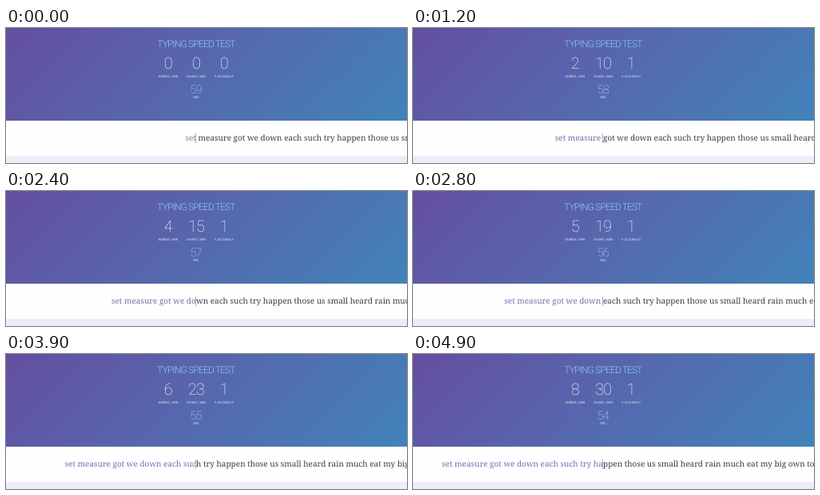
An HTML page for the animation above (5000 ms loop, 502 by 169 pixels).

```html
<!DOCTYPE html>
<html lang="en">
<head>
<meta charset="utf-8">
<title>Typing speed test</title>
<style>
html, body { margin: 0; width: 100%; height: 100%; overflow: hidden; background: #ecedf8; }
#stage { position: relative; width: 502px; height: 169px; overflow: hidden; }
.top { position: absolute; inset: 0 0 auto; height: 116px; background: linear-gradient(135deg, #644f9f, #5766ad 45%, #4183ba); }
.strip { position: absolute; top: 116px; left: 0; width: 100%; height: 44px; background: #fffeff; }
svg { position: absolute; inset: 0; }
text { font-family: Roboto, sans-serif; font-weight: 300; text-anchor: middle; white-space: pre; text-rendering: geometricPrecision; }
.title { font-size: 12px; letter-spacing: -.07em; fill: #88cbf2; }
.big { font-size: 20px; font-weight: 200; letter-spacing: -.05em; fill: #fff; }
.sec { font-size: 14.5px; font-weight: 200; letter-spacing: -.05em; fill: #c4e4f9; }
.label { font-size: 4px; font-weight: 400; fill: #e3e8f6; }
.line { font: 400 10.02px "Noto Serif", serif; }
#typed { text-anchor: end; fill: #6a75ac; }
#rest { text-anchor: start; fill: #3c3c40; }
</style>
</head>
<body>
<div id="stage">
  <div class="top"></div>
  <div class="strip"></div>
  <svg width="502" height="169" viewBox="0 0 502 169">
    <text class="title" x="238" y="23.6">TYPING SPEED TEST</text>
    <text class="big" id="words" x="202.8" y="51.2">0</text>
    <text class="big" id="chars" x="238" y="51.2">0</text>
    <text class="big" id="accuracy" x="272.7" y="51.2">0</text>
    <text class="label" x="203" y="62">WORDS / MIN</text>
    <text class="label" x="238" y="62">CHARS / MIN</text>
    <text class="label" x="273" y="62">% ACCURACY</text>
    <text class="sec" id="seconds" x="237.7" y="81.6">59</text>
    <text class="label" x="238" y="88.3">SEC</text>
    <text class="line" id="typed" x="237.8" y="141"></text>
    <text class="line" id="rest" x="238" y="141"></text>
    <rect x="237" y="132" width="1" height="12" fill="#a9a9b8"/>
  </svg>
</div>
<script>
const LOOP = 5000, STEP = 100, FIRST_TICK = 600;
const line = "set measure got we down each such try happen those us small heard rain much eat my big own to";
// [time in ms, letters typed]
const pace = [[0, 3], [1200, 12], [1800, 17], [2000, 18], [2800, 24], [3000, 25], [3400, 28],
  [3600, 30], [4200, 34], [4300, 35], [4700, 38], [4800, 38], [4900, 40], [5000, 40]];
const el = id => document.getElementById(id);

function lettersAt(t) {
  const i = pace.findIndex(p => p[0] > t);
  const [t0, n0] = pace[i - 1], [t1, n1] = pace[i];
  return Math.floor(n0 + (n1 - n0) * (t - t0) / (t1 - t0) + 1e-6);
}

function show(id, value) {
  const node = el(id);
  if (node.textContent !== String(value)) node.textContent = value;
}

function draw(t) {
  const n = lettersAt(t);
  const typed = line.slice(0, n);
  // a word counts once its space is typed
  const done = typed.split(" ").slice(0, -1);
  show("typed", typed);
  show("rest", line.slice(n));
  show("words", done.length);
  show("chars", done.join("").length);
  show("accuracy", done.length ? 1 : 0);
  show("seconds", 59 - Math.max(0, Math.floor((t - FIRST_TICK) / 1000) + 1));
  el("typed").style.fill = t < STEP ? "#7d80a0" : "";
}

const start = performance.now();
function frame(now) {
  const t = Math.max(0, now - start) % LOOP;
  draw(Math.floor(t / STEP) * STEP);
  requestAnimationFrame(frame);
}
draw(0);
requestAnimationFrame(frame);
</script>
</body>
</html>
```
